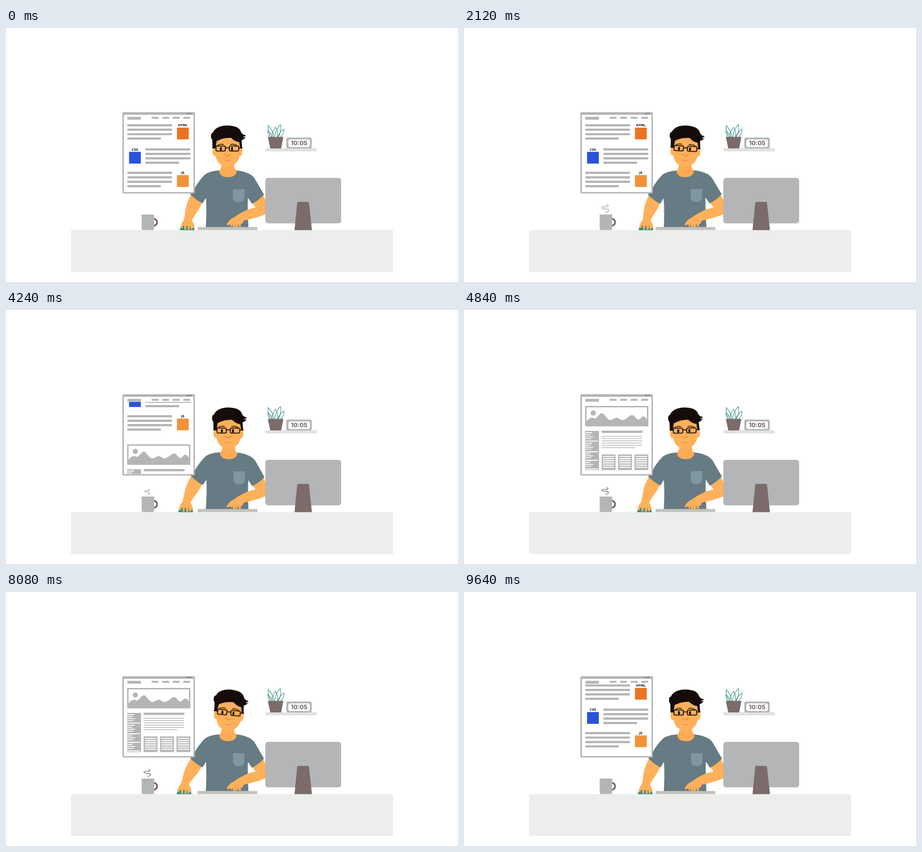
These frames come from a looping animation (998x561 px, 9680 ms). An HTML page:

```html
<!DOCTYPE html>
<html lang="en">
<head>
<meta charset="utf-8">
<title>Developer at a desk</title>
<style>
  html, body { margin: 0; width: 100%; height: 100%; overflow: hidden; background: #fff; }
  svg { display: block; width: 100%; height: 100%; }

  .grey { fill: #b4b5b7; }
  .brown { fill: #7c6b6b; }
  .skin { fill: #ffb05a; }
  .shirt { fill: #667b83; }
  .hair { fill: #150c0a; }
  .line { fill: none; stroke-linecap: round; stroke-linejoin: round; }
  .bars { fill: none; stroke: #b2b3b5; }
  .gaps { fill: none; stroke: #fff; }
  .finger { fill: none; stroke: #ffb05a; stroke-width: 4.8; stroke-linecap: round; }
  .label { font: bold 6.6px "DejaVu Sans", sans-serif; text-anchor: middle; fill: #111; }
  .time { font: bold 13.4px Inter, sans-serif; text-anchor: middle; fill: #6f6262; }

  .body, .head, .arm, .hand { animation: 9.68s ease-in-out infinite; }
  .body { animation-name: sway; transform-origin: 488px 440px; }
  .head { animation-name: tilt; transform-origin: 489px 303px; }
  .arm { animation-name: swing; transform-origin: 420px 370px; }
  .hand { animation-name: drag; }
  .scroll { animation: scroll 9.68s linear infinite; }
  .steam { animation: rise 3.22667s linear infinite; transform-origin: 312px 409px; }
  .tap { animation: tap .484s ease-in-out infinite; }
  .late { animation-delay: -.242s; }

  @keyframes sway {
    0%, 100% { transform: rotate(0deg); }
    21.9% { transform: rotate(-.7deg); }
    37.6% { transform: rotate(1.9deg); }
    50% { transform: rotate(-.3deg); }
    71.07% { transform: rotate(-1.9deg); }
    83.47% { transform: rotate(0deg); }
  }
  @keyframes tilt {
    0%, 37.6%, 71.07%, 100% { transform: rotate(0deg); }
    21.9% { transform: rotate(3.6deg); }
    50% { transform: rotate(-.8deg); }
    83.47% { transform: rotate(5.2deg); }
  }
  @keyframes swing {
    0%, 100% { transform: rotate(0deg); }
    21.9% { transform: rotate(-1.5deg); }
    37.6% { transform: rotate(4.6deg); }
    50% { transform: rotate(1.7deg); }
    71.07% { transform: rotate(-2.4deg); }
    83.47% { transform: rotate(6.4deg); }
  }
  @keyframes drag {
    0%, 100% { transform: translateX(0); }
    21.9% { transform: translateX(1.6px); }
    37.6% { transform: translateX(-5px); }
    50% { transform: translateX(-1.8px); }
    71.07% { transform: translateX(2.6px); }
    83.47% { transform: translateX(-7px); }
  }
  @keyframes scroll {
    0%, 39.67%, 100% { transform: translateY(0); }
    47.93%, 91.74% { transform: translateY(-170px); }
  }
  @keyframes rise {
    0% { opacity: 0; transform: scale(.4); }
    12.8% { opacity: .55; transform: scale(.58); }
    50% { opacity: 1; transform: scale(1); }
    65.7% { opacity: .6; transform: scale(1.1); }
    85%, 100% { opacity: 0; transform: scale(1.25); }
  }
  @keyframes tap {
    0%, 40%, 100% { transform: translateY(0); }
    70% { transform: translateY(-2px); }
  }
</style>
</head>
<body>
<svg viewBox="0 0 998 561">
  <defs>
    <clipPath id="view"><path d="M260 203H414V361.5H260Z"/></clipPath>
    <g id="card">
      <path class="grey" d="M304 319h30.5v34.5h-30.5z"/>
      <path class="gaps" stroke-width="2.4" d="M306.5 323.4h25.5m-25.5 4.8h25.5m-25.5 4.8h25.5m-25.5 4.8h25.5m-25.5 4.8h25.5m-25.5 4.8h25.5"/>
    </g>
    <path id="menu" d="M268 271h15m-15 4.3h11m-11 4.3h17m-17 4.3h13m-13 5.6h28"/>
  </defs>

  <!-- shelf -->
  <path fill="#e1e2e0" d="M573 265.5H686V272.5H573Z"/>
  <g class="line" stroke="#3d938b" stroke-width="1.2">
    <path d="M586 241Q577 228 579 215Q590 228 592 241"/>
    <path d="M583 241Q577 232 578 227Q586 232 589 241"/>
    <path d="M587 241Q588 228 595 219Q602 230 599 241"/>
    <path d="M593 241Q596 222 606 213Q609 228 601 241"/>
    <path d="M600 241Q604 229 614 223Q614 234 606 241"/>
  </g>
  <path class="brown" d="M578 240.5H612.5L607.5 266H583.5Z"/>
  <rect class="grey" x="619" y="242" width="56" height="24" rx="4"/>
  <rect x="623.5" y="246" width="47.5" height="17" rx="4" fill="#fff"/>
  <text class="time" x="647.3" y="259.4">10:05</text>

  <!-- mug -->
  <path class="line" stroke="#7c6b6b" stroke-width="4" d="M326 421.5a7.6 7.6 0 0 1 0 15.2"/>
  <path class="grey" d="M299.5 412H327V442Q327 446.5 322.5 446.5H304Q299.5 446.5 299.5 442Z"/>
  <path class="line steam" stroke="#7f7576" stroke-width="1.6"
    d="M312.5 407C317 407 320 404 318.5 402C316 398.5 305 402.5 304.5 398.5C304.5 395 311 397 315 396C319 395 319 392.5 315 392.5"/>

  <!-- mouse arm -->
  <path class="arm skin" d="M411 363Q397 389 395.5 408L392 430H409L411 424Q419 410 425 402L437 378Z"/>

  <!-- torso and head -->
  <g class="body">
    <path class="shirt" d="M472 314.5Q446 316 437 326Q427 336 417 353L407 367Q419 380 434 387.5L441.5 375Q443.5 405 441 443H535.5Q533 405 534 375L543 388Q558 381 569.5 368L548 331Q538 318 509 314.5Z"/>
    <path fill="#8097a0" d="M501 356H526.5V373Q526 384.5 513.5 384.5Q501.500 384.5 501 373Z"/>
    <path fill="#fdab56" d="M476 288V304Q475 312 471 314.5V318Q474 329.500 490 329.500Q506 329.500 509 318V314.5Q504 312 503.500 304V288Z"/>
    <g class="head">
      <ellipse class="skin" cx="461" cy="273" rx="5" ry="10"/>
      <ellipse class="skin" cx="517" cy="273" rx="5" ry="10"/>
      <path class="skin" d="M461 240H518V270Q517 291 506 300Q497 307 489 307Q481 307 472 300Q462 291 461 270Z"/>
      <path class="hair" d="M456 264L455.5 247Q452.500 244 452.500 238Q452.500 232 457 231Q460 222 473 217.5Q490 213 507 218Q517 222 519 230Q522 236 530 237Q527 240 523 241Q527 243 530 240Q526 246 520 248L521.5 265H517L515 252Q505 251 497 242.500Q480 242 468 248.500L465 250Q464 256 463 264Z"/>
      <g class="line" stroke="#1b1210" stroke-width="2.1">
        <path d="M467 259.300Q473 255.500 480 257.300M496 257.300Q503 255.500 509.500 259.300" stroke-width="1.800"/>
        <rect x="463.700" y="260.700" width="20.600" height="11" rx="2.500"/>
        <rect x="493.200" y="260.700" width="20.600" height="11" rx="2.500"/>
        <path d="M484.500 264.800H493M456 265H463.500M514 265H521.500"/>
      </g>
      <ellipse class="hair" cx="474.500" cy="267" rx="2.200" ry="4"/>
      <ellipse class="hair" cx="499" cy="267" rx="2.200" ry="4"/>
      <g class="line" stroke="#e67c3c" stroke-width="1.300">
        <path d="M482 279.500Q485 279.500 487 282Q489 284 491 282Q493 279.500 496 279.500"/>
        <path d="M482.500 292Q489 294.500 495 292"/>
      </g>
    </g>
  </g>

  <!-- keyboard and typing arm -->
  <path fill="#c2c3bd" d="M423 439.5H555V446.5H423Z"/>
  <path class="skin" d="M541 382L565 366Q576 382 578 398L574 411Q552 420 525 425.500Q523 433 518 433H499Q494 433 490 436Q486 436 488 432Q494 422 503 418.500Q526 401 551 396.500Z"/>
  <path class="finger tap" d="M499 428L498 436M509 429L509.500 438"/>
  <path class="finger tap late" d="M504 428L504 438M515 427L516.500 437"/>
  <path class="line" stroke="#e89a48" stroke-width=".8" d="M501.500 432V437M507 432V437M512.500 432V437"/>
  <g class="body">
    <path class="shirt" d="M534 372L543 388Q558 381 569.5 368L548 331L530 345Z"/>
  </g>

  <!-- mouse and hand -->
  <g class="hand">
    <path fill="#2f8a83" d="M384 447Q384 435 400 434Q416 435 416.500 447Z"/>
    <path class="skin" d="M393 424Q402 421 410.500 425Q414 430 414 437H387Q387 430 393 424Z"/>
    <path class="finger" d="M390 433L387.500 440M396.500 433L395.500 443M403.500 433V443.500M408.500 433L410 442.500M411.500 432L414 439"/>
  </g>

  <!-- desk and monitor -->
  <path fill="#ebeeeb" d="M143.5 446.5H854.5V539H143.5Z"/>
  <rect class="grey" x="572.5" y="331" width="167.500" height="100.500" rx="6"/>
  <path class="brown" d="M645.500 384H666.500Q668.500 384 669 386L675.500 446.500H637L643 386Q643.500 384 645.500 384Z"/>

  <!-- browser window -->
  <rect x="258.500" y="187.500" width="157" height="176.500" rx="1.500" fill="#fff" stroke="#b2b3b5" stroke-width="3"/>
  <path class="grey" d="M258 186.500H416V191.800H258Z"/>
  <path fill="#77787a" d="M399 187.500h2.500v2.500h-2.500zm4 0h2.500v2.500h-2.500zm4 0h2.500v2.500h-2.500z"/>
  <path class="grey" d="M268 196.300h30v6.300h-30zM321.500 196.300h15.500v4.300h-15.500zM345 196.300h15v4.300h-15zM368 196.300h15.500v4.300h-15.500zM391.500 196.300h15v4.300h-15z"/>

  <g clip-path="url(#view)">
    <g class="scroll">
      <path class="bars" stroke-width="4.700" d="M268 214.800h98.500m-98.500 9.900h98.500m-98.500 9.800h98.500m-98.500 9.700h74
        M308 268.200h99m-99 9.900h99m-99 9.800h99m-99 9.700h74
        M268 319.900h98.500m-98.500 9.900h98.500m-98.500 9.800h98.500m-98.500 9.700h74"/>
      <text class="label" x="390.300" y="217">HTML</text>
      <rect x="377.500" y="220" width="26" height="26" fill="#ea7424"/>
      <text class="label" x="284.700" y="270.500">CSS</text>
      <rect x="271.700" y="273.500" width="26" height="26" fill="#2a53d9"/>
      <text class="label" x="390.500" y="322">JS</text>
      <rect x="377.500" y="325" width="26" height="26" fill="#f2923a"/>

      <g transform="translate(0 170)">
        <rect x="269" y="213.500" width="136.500" height="42" fill="#fff" stroke="#b2b3b5" stroke-width="3"/>
        <circle class="grey" cx="285.500" cy="227.500" r="5.800"/>
        <path class="grey" d="M268 249Q276 238 282 238Q286 238 289 240C296 237 299 228 304 228C310 228 315 242 323 243C329 243 332 238 337 238C342 238 345 243 350 243C358 243 365 232 371 232C377 232 380 242 385 242C389 242 392 235 396 235C401 235 404 242 407 248V257H268Z"/>
        <path class="grey" d="M267.500 267h30.500v86.500h-30.500z"/>
        <g class="gaps" stroke-width="1.800">
          <use href="#menu"/><use href="#menu" y="23.500"/><use href="#menu" y="42.500"/><use href="#menu" y="61.500"/>
        </g>
        <path class="bars" stroke-width="5" d="M304 269h90"/>
        <path class="bars" stroke-width="1.500" d="M304 279h89m-89 5h89m-89 5h89m-89 5h89m-89 5h89m-89 5h74"/>
        <use href="#card"/><use href="#card" x="36.200"/><use href="#card" x="72.400"/>
      </g>
    </g>
  </g>
</svg>
</body>
</html>
```
